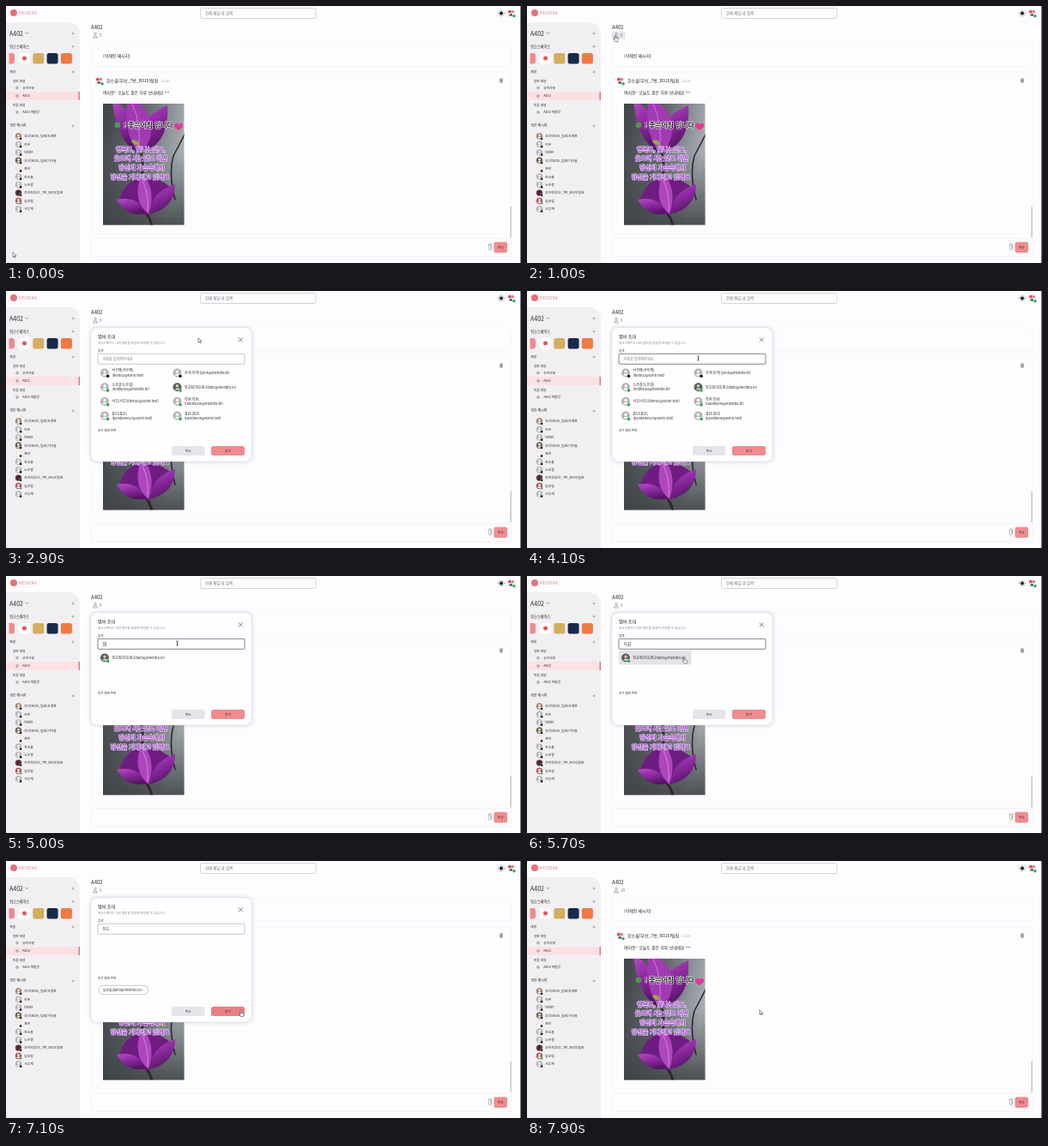
Animation of 600 by 300 pixels, one loop 8 s. Source, as an HTML page:

```html
<!DOCTYPE html>
<html lang="ko">
<head>
<meta charset="utf-8">
<title>멤버 초대</title>
<style>
html, body { margin: 0; width: 100%; height: 100%; overflow: hidden; background: #fdfcfe }
svg { display: block; width: 600px; height: 300px; font: 500 4px "Noto Sans CJK KR", "Noto Sans KR", "Noto Sans", sans-serif }
text { white-space: pre }
#modal > rect:first-child { filter: drop-shadow(0 0 2.5px rgba(80, 65, 100, .25)) }
</style>
</head>
<body>
<svg viewBox="0 0 600 300">
  <g id="page"></g>
  <g id="members"></g>
  <g id="modal"></g>
  <g id="cursor"></g>
</svg>
<script>
const $ = id => document.getElementById(id);
const INK = '#29272c', GREY = '#8d8991', PINK = '#f08b8e', GREEN = '#2fae55', PAPER = '#fdfcfe';

// y is the visual middle of the line
const text = (x, y, size, str, fill = INK, extra = '') =>
  `<text x="${x}" y="${y + size * .36}" font-size="${size}" fill="${fill}" ${extra}>${str}</text>`;
const rect = (x, y, w, h, r, fill, stroke = 'none', sw = .6) =>
  `<rect x="${x}" y="${y}" width="${w}" height="${h}" rx="${r}" fill="${fill}" stroke="${stroke}" stroke-width="${sw}"/>`;
const dot = (x, y, r, fill) => `<circle cx="${x}" cy="${y}" r="${r}" fill="${fill}"/>`;
const path = (d, fill, stroke = 'none', sw = .6) =>
  `<path d="${d}" fill="${fill}" stroke="${stroke}" stroke-width="${sw}" stroke-linecap="round" stroke-linejoin="round"/>`;
const plus = (x, y) => path(`M${x - 1.2} ${y}h2.4M${x} ${y - 1.2}v2.4`, 'none', '#77737b', .5);
const cross = (x, y, r, sw) =>
  path(`M${x - r} ${y - r}l${2 * r} ${2 * r}m0 ${-2 * r}l${-2 * r} ${2 * r}`, 'none', '#55525a', sw);
const MIDDLE = 'text-anchor="middle"';

function avatar(x, y, r, badge, back = '#b5b3b8', front = '#fff') {
  const k = r / 5;
  return dot(x, y, r, back) + dot(x, y - 1.4 * k, 1.7 * k, front) +
    path(`M${x - 3.1 * k} ${y + 3.3 * k}q${3.1 * k} ${-5 * k} ${6.2 * k} 0z`, front) +
    (badge ? dot(x + r * .7, y + r * .75, r * .45, '#fff') + dot(x + r * .7, y + r * .75, r * .37, badge) : '');
}

const flowerAvatar = (x, y, r) =>
  dot(x, y, r, '#f3eeee') + dot(x - r * .35, y - r * .3, r * .4, '#d8485e') +
  dot(x + r * .4, y - r * .3, r * .35, '#e8788a') +
  path(`M${x - r * .6} ${y + r * .7}l${r * .6} ${-r * .6}l${r * .5} ${r * .7}z`, '#3d4c46') +
  dot(x + r * .75, y + r * .8, r * .48, '#fff') + dot(x + r * .75, y + r * .8, r * .38, GREEN);

function photo() {
  const outlined = (x, y, size, str, fill, line) => text(x, y, size, str, fill,
    `font-weight="700" stroke="${line}" stroke-width="1.2" paint-order="stroke" stroke-linejoin="round" text-anchor="middle"`);
  return `<defs>
    <linearGradient id="dusk" x2="1" y2=".3"><stop stop-color="#3f4347"/><stop offset=".5" stop-color="#64696e"/><stop offset="1" stop-color="#a9aeb4"/></linearGradient>
    <linearGradient id="shade" x2="0" y2="1"><stop offset=".4" stop-color="#3b4042" stop-opacity="0"/><stop offset="1" stop-color="#3b4042" stop-opacity=".85"/></linearGradient>
    <linearGradient id="petal" x2=".4" y2="1"><stop stop-color="#b44ec4"/><stop offset=".5" stop-color="#8d2aa0"/><stop offset="1" stop-color="#561467"/></linearGradient>
    <clipPath id="frame"><rect x="113" y="114" width="94.500" height="141.500"/></clipPath></defs>
    <g clip-path="url(#frame)">` + rect(113, 114, 95, 142, 0, 'url(#dusk)') + rect(113, 114, 95, 142, 0, 'url(#shade)') +
    path('M208 150L195 175Q189 195 197 226', 'none', '#26262a', 1.5) +
    path('M156 168q5 16 2 34M164 243q4 5 6 14', 'none', '#34252f', 3) +
    path('M124 110q12 4 22 20q11 22 6 40q-24-14-28-60z', 'url(#petal)') +
    path('M188 116q2 32-14 46q-9 9-22 8q-4-38 36-54z', 'url(#petal)') +
    path('M142 108q30 10 27 40q-3 18-15 23q-19-26-12-63z', '#a23ab4') +
    path('M147 114q12 26 7 54', 'none', '#d58ade', .8) +
    path('M146 157q7-2 10 5q-8 2-10-5zM174 190q7-5 9 2q-6 3-9-2z', '#93ad3e') +
    path('M160 200q-22 2-29 30q12 14 34 13q24-4 30-28q-14-15-35-15z', '#6e1c80') +
    path('M129 226q24-5 36 16q-24 6-36-16z', 'url(#petal)') +
    path('M197 208q0 28-30 35q2-26 30-35z', 'url(#petal)') +
    path('M158 195q18 18 8 48q-20-16-8-48z', '#ae46be') +
    path('M159 204q8 16 6 36', 'none', '#dca0e4', .7) +
    dot(130, 139, 3.3, '#4e9a4c') +
    outlined(166, 139, 7.8, '! 좋은아침 입니다', '#26202b', '#f6f2f8') +
    path('M201 145q-8-5-3.500-8q2.500-1 3.500 1.500q1-2.500 3.500-1.500q4.500 3-3.500 8z', '#e8359a') +
    ['행복도, 빛나는것도,', '웃으며 사는것도 이면', '당신의 가슴속에서', '당신을 기다리고 있어요']
      .map((s, i) => outlined([157, 157, 158, 156][i], 167 + i * 10.7, 7, s, '#9b45c4', '#eedcf6')).join('') +
    '</g>';
}

function page() {
  let s = path('M0 19H72a14 14 0 0 1 14 14V300H0z', '#f2eff2');
  s += dot(9, 8, 4, '#e8707a') + text(14.500, 8.3, 5.3, 'MENDRA', '#df979c');
  s += rect(226.500, 2.500, 134.500, 12, 2, PAPER, '#bcb9c0', .6) + text(232, 8.500, 4.4, '현재 채널 내 검색', '#77737b');
  s += dot(577, 8.500, 1.9, '#111');
  for (let i = 0; i < 8; i++)
    s += `<path d="M577 5.700v-1" stroke="#111" stroke-width=".7" transform="rotate(${i * 45} 577 8.500)"/>`;
  s += flowerAvatar(588.500, 8, 4.6);

  s += text(4, 32, 7, 'A402') + path('M22.700 31l1.700 1.700l1.700-1.700', 'none', '#55525a');
  [32, 47.2, 77, 140].forEach(y => s += plus(78, y));
  s += text(4, 47.5, 4.2, '워크스페이스') + text(4, 77, 3.8, '채널') + text(4, 140, 4, '개인 메시지');
  s += path('M3.500 55h3.500q3 0 3 3v6.500q0 3-3 3h-3.500z', '#ee8a8f');
  ['#fff', '#d3ae60', '#18294b', '#ef7a42'].forEach((c, i) => s += rect(15 + i * 16.3, 55, 13, 12.5, 2.5, c));
  s += dot(21.500, 61, 2.5, '#e45361');

  s += rect(0, 100, 86, 10, 0, '#fbe1e3') + rect(84.500, 100, 1.5, 10, 0, '#d77a82');
  s += text(8, 87.500, 3.6, '일반 채널') + text(8, 115.500, 3.6, '토론 채널');
  [[95.500, '공지사항'], [105, 'A402'], [124, 'A402 떠들방']].forEach(([y, name]) => {
    s += `<circle cx="13" cy="${y}" r="1.500" fill="#c7c3ca" stroke="#858189" stroke-width=".5"/>` + text(19.3, y, 3.7, name);
  });
  const people = ['부산[B315_팀원]도영훈', '라온', 'tester', '부산[B315_팀원]기다솔', '표단',
    '한소율', '노은결', '추라희[부산_7반_B315]팀원', '담호림', '서우재'];
  const backs = ['#a38474', '#b5b3b8', '#b5b3b8', '#6e6250', '#eee6e0', '#b5b3b8', '#b5b3b8', '#66343c', '#b25661', '#b5b3b8'];
  people.forEach((name, i) => {
    const y = 152 + i * 9.44;
    s += avatar(14.500, y, 3.7, i == 8 ? GREEN : '#18161a', backs[i], i == 7 ? '#2c242a' : '#fff') + text(21.3, y, 3.75, name);
  });

  const line = '#f4f1f6';
  s += text(99, 25, 6, 'A402');
  s += rect(99, 43, 490, 27, 2, PAPER, line) + text(113, 58.500, 4.9, '(삭제된 메시지)');
  s += rect(99, 77, 490, 189, 2, PAPER, line) + flowerAvatar(108.500, 87, 4.7);
  s += text(117, 87.500, 5, '한소율[부산_7반_B315]팀원') + text(180.500, 87.500, 4, '14:26', '#b3afb7');
  s += path('M575.700 86h2.800l-.300 3.300h-2.200zM575.200 85.200h3.800M576.500 84.600h1.200', '#a9a5ad', '#55525a', .4);
  s += text(113, 101, 4.85, '여러분~ 오늘도 좋은 하루 보내세요 ^^') + photo();
  s += rect(587.300, 233.500, 1.7, 37, .8, '#d0cdd2');
  s += rect(99, 271.500, 490, 21, 2, PAPER, '#efecf1');
  s += path('M565.500 280v3.500a1.600 1.600 0 0 1-3.200 0v-4a1 1 0 0 1 2.200 0v3.800M565.800 280.500v-1.200a1.900 1.900 0 0 0-3.800 0', 'none', '#85818a', .5);
  s += rect(568.500, 275.500, 15.500, 12.500, 2, PINK) + text(576.200, 282, 3.8, '전송', INK, MIDDLE);
  s += rect(599, 0, 1, 300, 0, '#77757a');
  return s;
}

function members({ hover, count }) {
  return (hover ? rect(98.500, 29.500, 16, 9, 1.5, '#e8e5ea') : '') +
    `<circle cx="104" cy="32.600" r="1.300" fill="none" stroke="#6d6972" stroke-width=".5"/>` +
    path('M101.500 36.700q0-2 2.500-2t2.500 2z', 'none', '#6d6972', .5) +
    text(109, 34.200, 4.3, count, '#6d6972');
}

const ROWS = [
  ['서우재[서우재]', '(demo2@sorin.test)'], ['윤하[윤하](yoon@mendra.kr)'],
  ['노은결[노은결]', '(nohkyul2@mendra.kr)', 1], ['담호림[담호림](dami@mendra.io)', '', 1],
  ['사오[사오](demo1@sorin.test)', '', 1], ['라온[라온]', '(raonbyeol@mendra.kr)', 1],
  ['표단[표단]', '(pyodanee27@sorin.test)', 1], ['표단[표단]', '(pyodan08@sorin.test)', 1]
];
const darkAvatar = (x, y) => avatar(x, y, 5, GREEN, '#59605b', '#d5cbc0');

function modal({ open, view, typed, focus, hoverRow, hoverAdd }) {
  if (!open) return '';
  const height = { list: 156, result: 131, chip: 145 }[view], bottom = 43 + height;
  let s = rect(99, 43, 187, height, 7, '#fefdff', '#e7e3ea', .5);
  s += text(107, 53.300, 5.1, '멤버 초대') + cross(273.300, 56.800, 2.2, .7);
  s += text(107, 61.200, 3.55, '워크스페이스 내의 멤버를 채널에 초대할 수 있습니다.', GREY) + text(107, 70, 3.5, '검색');
  s += rect(107, 73.300, 171, 12, 1.2, '#fff', focus ? '#65636f' : '#a5a2aa', focus ? .8 : .6);
  s += typed ? text(112.500, 79.500, 4.1, typed) : text(112.500, 79.500, 4.05, '이름을 입력해주세요.', '#77737b');
  if (focus && typed) {
    const end = 112.500 + typed.length * 3.8;
    s += path(`M${end - 3.6} 82h3.400M${end + .300} 77.300v4.400`, 'none', INK, .4);
  }
  if (view == 'list') ROWS.forEach(([name, mail, online], i) => {
    const x = i % 2 ? 199.500 : 115, y = 95.500 + (i >> 1) * 16.7;
    s += i == 3 ? darkAvatar(x, y) : avatar(x, y, 5, online ? GREEN : '#18161a');
    s += mail ? text(x + 8.500, y - 2.500, 4, name) + text(x + 8.500, y + 2.800, 4, mail) : text(x + 8.500, y, 4, name);
  });
  if (view == 'result') {
    if (hoverRow) s += rect(107, 87, 84.500, 16.500, 2, '#e5e2e7');
    s += darkAvatar(115, 95.500) + text(123.500, 95.500, 4.1, ROWS[3][0]);
  }
  s += text(107, view == 'list' ? 162.500 : 136.800, 3.5, '추가 멤버 목록');
  if (view == 'chip')
    s += rect(108, 145.300, 57.500, 10.500, 5.2, '#fff', '#a5a2aa', .6) +
      text(113, 150.500, 3.8, '담호림(dami@mendra.io)') + cross(158, 150.500, 1, .4);
  s += rect(193, bottom - 18, 38.500, 11, 2.5, '#e7e4e9') + text(212.200, bottom - 12.500, 3.7, '취소', INK, MIDDLE);
  s += rect(239, bottom - 18, 39, 11, 2.5, hoverAdd ? '#e97f84' : PINK) + text(258.500, bottom - 12.500, 3.7, '추가', INK, MIDDLE);
  return s;
}

const POINTERS = {
  arrow: path('M0 0v5l1.200-1l.900 1.900l.900-.400l-.900-1.800h1.600z', '#fff', '#222', .5),
  hand: path('M-.500.500q.600-.900 1.200 0v2.300l2.600.700q.700.300.500 1.200l-.600 2.300h-3.200l-2-2.700q.300-.900 1.500 0z', '#fff', '#222', .5),
  beam: path('M-1.100-2.700q1.100 0 1.100.700v4q0 .700-1.100.700M1.100-2.700q-1.100 0-1.100.700v4q0 .700 1.100.700', 'none', '#222', .55)
};
const TRACK = [[0, 8, 288], [250, 8, 288], [950, 102.5, 34.5], [1650, 102.5, 34.5], [2500, 224, 55], [3600, 224, 55],
  [4000, 199.5, 78.5], [5000, 199.5, 78.5], [5600, 183, 95], [6100, 183, 95], [6900, 273.5, 174.5], [7500, 273.5, 174.5], [7700, 271, 174], [8000, 271, 174]];
const SHAPES = [[0, 'arrow'], [930, 'hand'], [1750, 'arrow'], [3850, 'beam'], [5250, 'hand'], [6150, 'arrow'], [6750, 'hand'], [7500, 'arrow']];
const TYPING = ['ㄷ', '다', '담', '담ㅎ', '담호'];

function pointAt(t) {
  const i = TRACK.findIndex(p => p[0] > t), [t0, x0, y0] = TRACK[i - 1], [t1, x1, y1] = TRACK[i];
  const k = (t - t0) / (t1 - t0), e = k * k * (3 - 2 * k);
  return [x0 + (x1 - x0) * e, y0 + (y1 - y0) * e];
}

const stateAt = t => ({
  hover: t >= 930 && t < 1750,
  count: t < 7500 ? '9' : '10',
  open: t >= 1500 && t < 7500,
  view: t < 5000 ? 'list' : t < 6000 ? 'result' : 'chip',
  typed: t < 4600 ? '' : TYPING[Math.min(4, Math.floor((t - 4600) / 150))],
  focus: t >= 4050 && t < 6000,
  hoverRow: t >= 5450,
  hoverAdd: t >= 6750
});

$('page').innerHTML = page();
let lastKey, lastShape;
function draw() {
  const t = performance.now() % 8000, state = stateAt(t), key = JSON.stringify(state);
  if (key != lastKey) {
    $('members').innerHTML = members(state);
    $('modal').innerHTML = modal(state);
    lastKey = key;
  }
  const shape = SHAPES.filter(s => s[0] <= t).pop()[1];
  if (shape != lastShape) $('cursor').innerHTML = POINTERS[lastShape = shape];
  $('cursor').setAttribute('transform', `translate(${pointAt(t)})`);
  requestAnimationFrame(draw);
}
draw();
</script>
</body>
</html>
```
